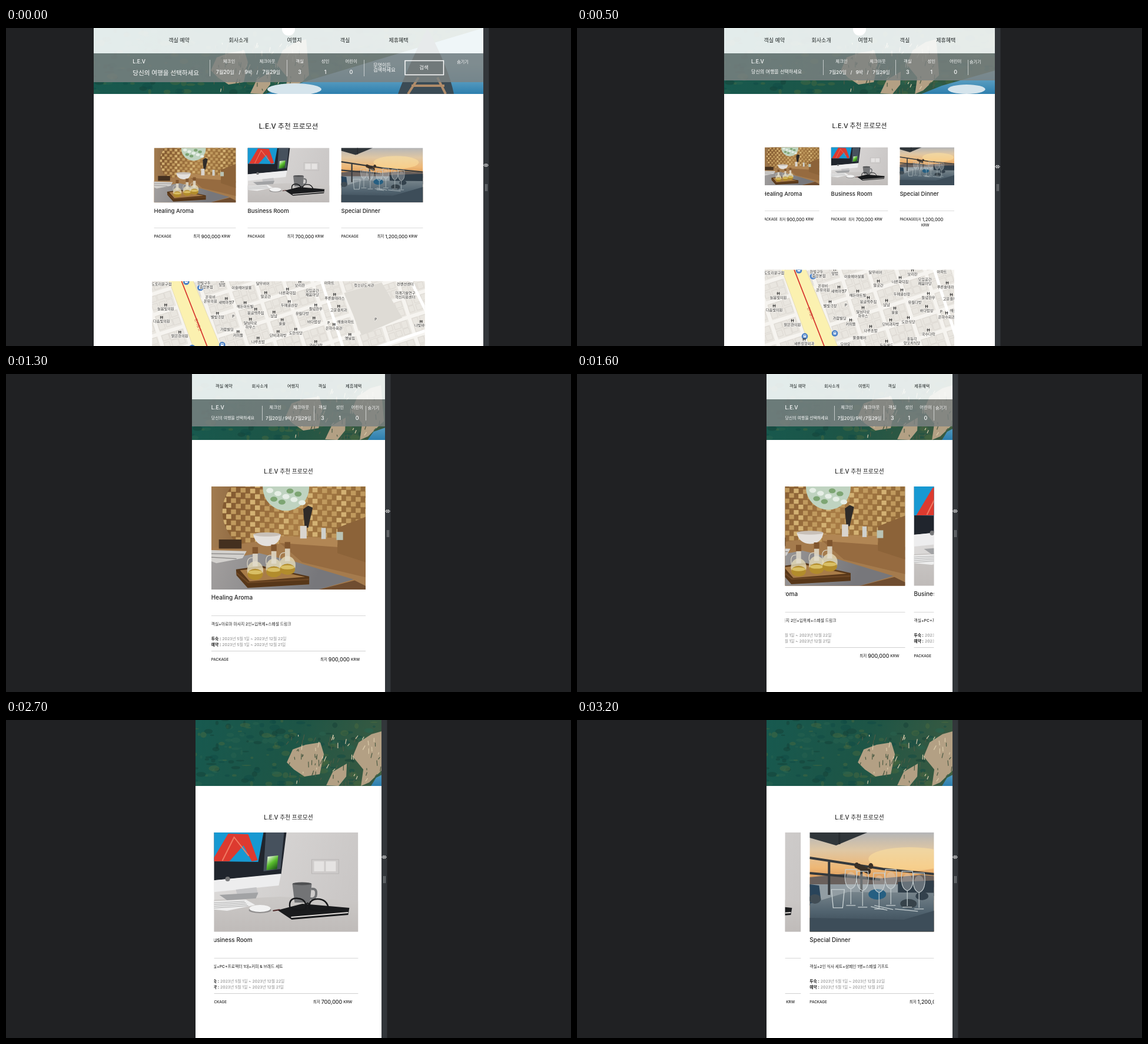
An HTML page with a canvas that plays this animation: 960x540 px, repeating every 3.3 s.

```html
<!DOCTYPE html>
<html lang="ko">
<head>
<meta charset="utf-8">
<style>
html, body { margin: 0; width: 100%; height: 100%; overflow: hidden; background: #202123; }
canvas { display: block; }
</style>
</head>
<body>
<canvas id="stage" width="960" height="540"></canvas>
<script>
const g = document.getElementById('stage').getContext('2d');
const BRAND = 'L.E.V';
const FONT = 'Inter, "Noto Sans CJK KR", "Noto Sans CJK", sans-serif';
const LOOP = 3300, STEP = 100;

// Left page edge over time; the page stays centred on x = 480.
const EDGE = [[0, 149], [100, 160], [300, 218], [500, 250], [600, 256], [900, 288], [1200, 309], [1300, 316], [1500, 322], [LOOP, 322]];
const WIDTHS = [662, 461, 384, 329];
let L, R, W;

const clamp = v => Math.max(0, Math.min(1, v));
const ease = (t, start, dur) => { const u = clamp((t - start) / dur); return u * u * (3 - 2 * u); };

function edgeAt(t) {
  const i = EDGE.findIndex(([time]) => time > t);
  const [t0, a] = EDGE[i - 1], [t1, b] = EDGE[i];
  return a + (b - a) * (t - t0) / (t1 - t0);
}

// Responsive value, given at each of WIDTHS.
function at(...v) {
  const i = W > 461 ? 0 : W > 384 ? 1 : 2;
  return v[i] + (v[i + 1] - v[i]) * (WIDTHS[i] - W) / (WIDTHS[i] - WIDTHS[i + 1]);
}

function random(seed) {
  return () => (seed = (seed * 16807) % 2147483647) / 2147483647;
}

function text(s, x, y, size, color = '#222', align = 'left', weight = 500) {
  g.font = `${weight} ${size}px ${FONT}`;
  g.fillStyle = color;
  g.textAlign = align;
  g.fillText(s, x, y + size * 0.36);
  return g.measureText(s).width;
}
const rect = (c, x, y, w, h) => { g.fillStyle = c; g.fillRect(x, y, w, h); };
const fill = (c, d) => { g.fillStyle = c; g.fill(new Path2D(d)); };
const line = (c, w, d) => { g.strokeStyle = c; g.lineWidth = w; g.stroke(new Path2D(d)); };
function oval(c, x, y, rx, ry = rx) {
  g.fillStyle = c;
  g.beginPath();
  g.ellipse(x, y, rx, ry, 0, 0, 7);
  g.fill();
}
function fade(x0, y0, x1, y1, ...colors) {
  const f = g.createLinearGradient(x0, y0, x1, y1);
  colors.forEach((c, i) => f.addColorStop(i / (colors.length - 1), c));
  return f;
}
function clipped(x, y, w, h, draw) {
  g.save();
  g.beginPath();
  g.rect(x, y, w, h);
  g.clip();
  draw();
  g.restore();
}

function hero() {
  const rnd = random(7);
  rect(fade(L, 0, R, 112, '#17594f', '#1d5546', '#3d5a40'), L, 0, W, 112);
  for (let i = 0; i < 420; i++) {
    g.globalAlpha = 0.45;
    oval(['#0f4a45', '#2b6350', '#153f36', '#4c6a3f'][i % 4], L + rnd() * 662, rnd() * 112, 2 + rnd() * 7, 1 + rnd() * 4);
  }
  g.globalAlpha = 1;
  g.save();
  g.translate(at(-130, -30, -12, -3), 0);
  fill('#b3a084', 'M478 72L488 50L510 42L535 38L541 58L534 92L508 96L490 84ZM545 111L556 88L580 74L579 96L566 112ZM590 62L600 38L622 24L640 19L645 80L618 106L604 112L608 84Z');
  for (let i = 0; i < 90; i++) {
    const x = 480 + rnd() * 160, y = 22 + rnd() * 86;
    line(i % 3 ? '#4c5b45' : '#dcccab', 1.2, `M${x} ${y}l${rnd() * 5 - 4} ${3 + rnd() * 7}`);
  }
  g.restore();
  const x = at(440, 585, 588, 614);
  fill(fade(0, 60, 0, 112, '#8fc0d6', '#2d7fae'), `M${x} 112L${x + at(45, 35, 16, 10)} 98L${R} ${at(0, 72, 82, 91)}V112Z`);
  if (W > 340) oval('#d5e4ec', at(490, 662, 655, 650), 104, at(46, 32, 20, 5), at(10, 8, 6, 3));
  if (W > 560) {
    fill('#3b4b55', `M${R - 145} 112Q${R - 130} 70 ${R - 95} 0Q${R - 58} 70 ${R - 50} 112Z`);
    line('#b08c6a', 4, `M${R - 128} 112L${R - 110} 84M${R - 64} 112L${R - 78} 84M${R - 122} 98H${R - 66}`);
  }
}

function header(dy) {
  g.save();
  g.translate(0, dy);
  const bottom = at(92, 89, 89, 89), white = '#fff';
  rect('rgba(250,252,252,.9)', L, 0, W, 43);
  rect('rgba(124,130,130,.83)', L, 43, W, bottom - 43);
  if (W > 440) oval(white, 480, 2, 11);
  const mid = (s, x, y, size, color = white) => text(s, x, y, size, color, 'center');
  const nav = at(9, 9, 9, 7.4), navColor = '#1e2424';
  mid('객실 예약', at(294, 335, 350, 370), 20.5, nav, navColor);
  mid('회사소개', at(395, 415, 422.5, 431), 20.5, nav, navColor);
  mid('여행지', at(490, 490, 489.5, 488), 20.5, nav, navColor);
  mid('객실', at(576, 557, 548, 537.5), 20.5, nav, navColor);
  mid('제휴혜택', at(667, 627, 611, 591), 20.5, nav, navColor);

  const y2 = at(76, 74, 75, 75);
  text(BRAND, L + W * 0.1, 57, 8.8, white);
  text('당신의 여행을 선택하세요', L + W * 0.1, y2, at(10.6, 8.1, 6.9, 6.9), white);
  for (const x of [at(346, 418, 428, 435), at(477, 541, 530, 523), at(608, 664, 632, 611)])
    rect('rgba(255,255,255,.6)', Math.round(x), 54, 1, at(28, 26, 25, 25));
  mid('체크인', at(379, 449.5, 454, 457.5), 56.5, 7.4);
  mid('체크아웃', at(444, 511, 505, 501.5), 56.5, 7.4);
  const date = at(8.4, 8, 7.7, 7.5);
  mid('7월20일', at(372.5, 443, 449, 455), 75, date);
  mid('/', at(397, 466, 470, 471), 75, date);
  mid('9박', at(412, 480, 480, 479.5), 75, date);
  mid('/', at(427, 494, 491, 488.5), 75, date);
  mid('7월29일', at(451, 517, 510.5, 505), 75, date);
  const guests = [['객실', 3, at(499, 562, 547.5, 538)], ['성인', 1, at(542.5, 602.5, 582, 567.5)], ['어린이', 0, at(586.5, 643.5, 616, 597)]];
  for (const [name, n, x] of guests) {
    mid(name, x, 56.5, 7.4);
    mid(n, x, 75, 9);
  }
  if (W > 600) {
    text('무엇이든', R - 187, 63, 8.2, white);
    text('검색하세요', R - 187, 71, 8.2, white);
    line(white, 1.5, `M${R - 133} 55.5H${R - 67.5}V79.5H${R - 133}Z`);
    mid('검색', R - 101, 67, 8.4);
  }
  mid('숨기기', at(776, 677, 652, 625), 57, 7);
  g.restore();
}

function aroma() {
  rect(fade(0, 0, 306, 0, '#a27c50', '#6a4526', '#5f3f22'), 0, 0, 306, 205);
  g.save();
  g.beginPath();
  g.ellipse(190, 50, 168, 112, 0, 0, 7);
  g.clip();
  rect(fade(30, 0, 306, 100, '#80572f', '#a87c45', '#8c6536'), 0, 0, 306, 170);
  for (let row = 0; row < 12; row++)
    for (let col = 0; col < 16; col++)
      rect(col % 3 ? '#c09a5e' : '#d3b173', 20 + col * 19 + row % 2 * 9.5, row * 11 + col * 1.5 - 22, 10, 9);
  g.restore();
  oval('#bfd3c0', 148, 2, 46);
  for (let i = 0; i < 9; i++) oval(i % 2 ? '#7da573' : '#e6eee6', 116 + i * 8, 8 + i * 17 % 28, 7, 5);
  fill('#a57b4d', 'M0 122L100 108L306 145V205H0Z');
  fill('#b18654', 'M136 98L250 102V122L136 112Z');
  fill('#966b40', 'M136 112L306 124V180L180 150Z');
  fill('#8c6339', 'M250 82L306 60V150L250 132Z');
  fill('#e4e0dc', 'M83 95H138Q134 118 110 118Q88 117 83 95Z');
  oval('#c8c0b8', 110.5, 95, 27, 4);
  fill('#2f2b28', 'M185 80L182 45L192 38L201 42L192 82Z');
  rect('#d9d4ce', 176, 78, 13, 25);
  rect('#cfd0cc', 218, 82, 9, 22);
  rect('#b9c3b5', 248, 90, 13, 16);
  rect('#44301f', 15, 105, 45, 18);
  fill(fade(0, 130, 200, 205, '#a3a09f', '#77777b'), 'M0 148L95 132L170 150L282 184L210 205H0Z');
  fill('#6f4d30', 'M210 205L284 186L306 197V205Z');
  fill('#d2d0cd', 'M0 126L70 128L62 142L10 152L0 148Z');
  line('#868483', 1.5, 'M0 133L65 134M0 140L50 143');
  fill('#573719', 'M49 164L100 157L194 178V194L72 201L50 176Z');
  fill('#a87c48', 'M57 166L100 161L186 179L76 188Z');
  for (const [x, y] of [[87, 174], [124, 169], [151, 164]]) {
    oval('rgba(230,220,185,.8)', x, y - 8, 16, 18);
    oval('#b28c2c', x, y, 15, 11);
    oval('#d9bf65', x, y - 4, 14, 4);
    rect('rgba(226,220,204,.85)', x - 5, y - 42, 10, 26);
    rect('#80562f', x - 5.5, y - 54, 11, 13);
    line('#d8d2c2', 1.5, `M${x - 5} ${y - 33}Q${x - 18} ${y - 34} ${x - 15} ${y - 15}`);
  }
  line('#6d4724', 3, 'M50 171L73 190L193 184');
}

function business() {
  rect(fade(0, 0, 253, 100, '#dedcdb', '#c9c6c5'), 0, 0, 253, 169);
  fill(fade(0, 110, 0, 169, '#cbc8c6', '#bfbbb9'), 'M0 115L120 109L253 116V169H0Z');
  fill('#20252d', 'M0 0H131L122 71L0 82Z');
  fill('#1799d2', 'M0 0H92L83 50L0 49Z');
  fill('#dd3a2f', 'M4 49L32 2L66 3L82 47L72 49L58 22L34 49Z');
  line('#f07a62', 2, 'M22 48L42 8L67 40');
  fill('#46515d', 'M96 0H127L121 62L92 66Z');
  fill(fade(98, 40, 116, 62, '#fff', '#59bd2c', '#174c18'), 'M99 41L117 39L115 62L97 64Z');
  fill('#ededee', 'M0 82L122 70L118 90L0 102Z');
  oval('#77787a', 31, 79, 4);
  fill('#c4c4c6', 'M45 97L80 93L83 106L48 108Z');
  fill('#a2a3a5', 'M17 106L83 102L79 112L30 115Z');
  fill('#eeeeee', 'M0 117L62 114L78 123L30 133L0 130Z');
  for (let i = 0; i < 4; i++) line('#9a9a9a', 0.8, `M0 ${120 + i * 3}L${60 + i * 2} ${117 + i * 2.5}`);
  oval('#8f8d8d', 86, 132, 19, 5);
  oval('#f2f2f2', 86, 129, 18, 6);
  g.strokeStyle = '#b9b6b5';
  g.lineWidth = 1;
  g.strokeRect(174, 46, 46, 24);
  rect('#e5e3e2', 178, 49, 17, 17);
  rect('#e5e3e2', 198, 49, 17, 17);
  fill('#737476', 'M141 87H174L171 119H145Z');
  oval('#4f5052', 157.5, 87, 16, 2.5);
  line('#737476', 4, 'M173 96Q184 94 181 108Q178 114 171 112');
  fill('#1a1b1d', 'M116 132L158 121L238 128L236 140L140 148Z');
  line('#e2dedb', 2, 'M139 144L236 136');
  line('#4c2525', 2, 'M108 133L120 131');
  line('#17181a', 2.5, 'M137 128Q134 111 150 112Q166 113 164 130Q150 134 137 128ZM170 130Q168 113 184 113Q200 113 203 130Q185 136 170 130ZM164 122Q167 118 170 122');
}

function dinner() {
  rect(fade(0, 0, 0, 90, '#b4b5b7', '#dfc7a4', '#eeb775', '#cf8a4c'), 0, 0, 253, 169);
  oval('rgba(255,226,158,.55)', 170, 45, 70, 20);
  fill('#69605c', 'M0 76L60 70L120 78L190 72L253 77V93H0Z');
  fill('#929da3', 'M0 88H253V115H0Z');
  fill('#30363a', 'M0 0H98L45 22L0 9Z');
  rect('#272c30', 49, 0, 3, 20);
  line('#34393d', 4, 'M0 43L125 62L253 75M33 47V106M88 58V100M0 69L120 80');
  for (let i = 0; i < 7; i++) oval('#3a3027', 80 + i * 4, 56 + i * 13 % 11, 4, 5);
  fill('#29445a', 'M0 88L16 90L20 121L0 124Z');
  fill('#303e49', 'M150 84L253 80V112L150 102Z');
  fill(fade(0, 100, 0, 169, '#78858c', '#51636f', '#34434f'), 'M0 121L65 101L253 103V169H0Z');
  fill('#3d4d59', 'M0 145L160 148L253 121V169H0Z');
  oval('#414d55', 9, 113, 10, 8);
  oval('#265f82', 115, 105, 15, 9);
  oval('#36424a', 168, 121, 14, 8);
  oval('#33414c', 191, 108, 11, 7);
  const glass = '#c7d0d2';
  for (let i = 0; i < 6; i++) {
    const x = 70 + i * 24 - i % 2 * 4, y = 63 + i % 3 * 3;
    line(glass, 1.2, `M${x - 9} ${y}Q${x - 13} ${y + 29} ${x} ${y + 33}Q${x + 13} ${y + 29} ${x + 9} ${y}ZM${x} ${y + 33}V${y + 59}M${x - 8} ${y + 61}H${x + 8}`);
    oval('rgba(218,222,219,.32)', x, y + 18, 9, 14);
  }
  line(glass, 1.4, 'M37 97L40 128H56L59 97ZM104 126L132 132M110 124L142 131M145 130L184 134');
}

const CARDS = [
  { name: 'Healing Aroma', note: '객실+아로마 마사지 2인+입욕제+스페셜 드링크', price: '900,000', photo: aroma, base: 306 },
  { name: 'Business Room', note: '객실+PC+프로젝터 1대+커피 & 브래드 세트', price: '700,000', photo: business, base: 253 },
  { name: 'Special Dinner', note: '객실+2인 식사 세트+샴페인 1병+스페셜 기프트', price: '1,200,000', photo: dinner, base: 253 }
];

function photo(card, x, y, w) {
  clipped(x, y, w, w * 0.667, () => {
    g.translate(x, y);
    g.scale(w / card.base, w / card.base);
    card.photo();
  });
}

function price(card, right, y, small, big, wrap) {
  if (!wrap) right -= text('KRW', right, y, small, '#222', 'right') + 2;
  right -= text(card.price, right, y, big, '#222', 'right') + 2;
  const w = text('최저', right, y, small, '#222', 'right');
  if (wrap) text('KRW', right - w + 11, y + 10, small);
}

function columns() {
  const w = at(139, 97, 81, 70), y = at(203.5, 202.5, 202, 202), end = y + w * 0.667;
  clipped(L + W * 0.15, 180, W * 0.7, 240, () => CARDS.forEach((card, i) => {
    const x = 480 - w / 2 + (i - 1) * (w + 20);
    photo(card, x, y, w);
    text(card.name, x, end + 14, 9.6);
    rect('#dcdcdc', x, Math.round(end + 43), w, 1);
    text('PACKAGE', x, end + 58, at(6.3, 5.6, 5.4, 5.4));
    const wrap = i === 2 && w < 110;
    price(card, x + w - (wrap ? 23 : 9.5), end + 58, at(6.3, 5.8, 5.6, 5.6), at(7.9, 7.4, 7.2, 7.2), wrap);
  }));
}

function carousel(pos) {
  const x0 = L + W * 0.1, w = W * 0.8, y = 191, end = y + w * 0.667;
  clipped(x0, y, w, 349, () => CARDS.forEach((card, i) => {
    const x = x0 + (i - pos) * (w + 15);
    if (x > x0 + w || x + w < x0) return;
    photo(card, x, y, w);
    text(card.name, x, end + 13.5, 10);
    rect('#d8d8d8', x, Math.round(end + 44), w, 1);
    text(card.note, x, end + 58.5, 6.8);
    [['투숙 :', 22], ['예약 :', 21]].forEach(([label, day], row) => {
      const ty = end + 83.5 + row * 10;
      text(label, x, ty, 6.8, '#222', 'left', 700);
      text(`2023년 5월 1일 ~ 2023년 12월 ${day}일`, x + 18.5, ty, 6.8, '#929292');
    });
    rect('#d0d0d0', x, Math.round(end + 104), w, 1);
    text('PACKAGE', x, end + 119, 6.3);
    price(card, x + w - 10, end + 119, 6.5, 8.8);
  }));
}

// name, x, y; a star adds a place icon above the name.
const PLACES = `도토리문구점,16,5|한빛구두,88,3|중앙본점,92,10|*덮밥,119,6|이슬헤어살롱,152,11|달무비어,188,4|*보리잔,251,7
모임공간,272,16|채움마당,272,23|*너른화덕집,230,20|*알곳간,193,26|아파트,301,3|*푸른솔테라스,310,29|청소년도서관,360,7|컨벤션센터,430,5
미래기술연구,430,20|혁신지원센터,430,27|온유비,99,27|온유의원,99,34|*새벽마켓7,126,36|*해든아트빌,158,43|*늘봄빛의원,23,47|*두메골산장,233,41
*들녘한우,278,47|*고운결치과,317,49|*별빛극장,111,61|*몽글맥주집,176,54|*냠냠,207,59|유월다방,255,55|*달님타로,167,71|하우스,167,78
*술술,221,72|*바다밥상,275,69|해솔아파트,329,69|*은하수회관,309,80|*다솜빛의원,16,68|*맑은한의원,47,93|가람빌딩,127,82|*커피뜰,146,92
*단비과자방,214,92|*도란식당,244,88|*나루초밥,180,103|*옛날집,336,97|*국수다락,278,109|*나빛바디,457,75|모아요,137,126|물결헤어,161,115
*든든샌드,207,128|*새론성형외과,67,125|홍등각,250,117|양꼬치식당,250,124|P,138,60|P,380,65|P,300,71`
  .split(/[|\n]/).map(s => s.split(','));

function map() {
  const x0 = L + W * 0.15, y0 = at(430, 410.5, 403, 398);
  clipped(x0, y0, W * 0.7, 540 - y0, () => {
    g.translate(x0, y0);
    rect('#f6f4f0', 0, 0, 470, 140);
    const rnd = random(31);
    g.save();
    g.rotate(-0.31);
    for (let x = -60; x < 480; x += 46)
      for (let y = -10; y < 300; y += 34) {
        rect('#e9e6e0', x, y, 40, 28);
        g.strokeStyle = '#d6d2cb';
        g.lineWidth = 0.6;
        for (let i = 0; i < 6; i++)
          g.strokeRect(x + 1 + i % 3 * 13, y + 1 + (i > 2) * 13, 9 + rnd() * 3, 9 + rnd() * 3);
      }
    g.restore();
    fill('#dedbd5', 'M326 20L390 2L425 62L356 92Z');
    line('#fff', 5, 'M288 0L330 130M440 0L470 60M345 125L470 82');
    fill('#fbf1b0', 'M29 0H70L128 140H80Z');
    line('#e7ddb4', 1, 'M29 0L80 140M70 0L128 140');
    line('#d6332d', 1.7, 'M50 0L105 140');
    g.save();
    g.translate(78, 74);
    g.rotate(1.19);
    text('한가람선', 0, 0, 6, '#c93a32', 'center');
    g.restore();
    for (const [x, y] of [[58, 1], [82, 11], [68, 113], [119, 108]]) {
      oval('#4a80c6', x, y, 5.3);
      rect('#fff', x - 2.3, y - 2.6, 4.6, 4.6);
      rect('#4a80c6', x - 1.5, y - 1.7, 3, 1.5);
    }
    for (const [s, px, py] of PLACES) {
      const x = +px, y = +py;
      g.lineJoin = 'round';
      g.lineWidth = 1.6;
      g.strokeStyle = '#f6f4f0';
      g.font = `500 6.2px ${FONT}`;
      g.textAlign = 'center';
      const name = s.replace('*', '');
      g.strokeText(name, x, y + 2.2);
      text(name, x, y, 6.2, '#333', 'center');
      if (s[0] === '*') line('#333', 1, `M${x - 1.5} ${y - 9}v5M${x + 1.5} ${y - 9}v5M${x - 2.5} ${y - 7}h5`);
    }
  });
}

function handle() {
  rect('#32363a', R, 0, 9.5, 540);
  rect('#94979a', R + 3.3, 265, 1, 12);
  rect('#94979a', R + 5.6, 265, 1, 12);
  const y = at(233, 235.5, 234, 233), x = R + 4.5;
  line('#e8e8e8', 1, `M${x - 1} ${y - 2.5}L${x - 4} ${y}L${x - 1} ${y + 2.5}ZM${x + 1} ${y - 2.5}L${x + 4} ${y}L${x + 1} ${y + 2.5}Z`);
}

function draw(t) {
  L = edgeAt(t);
  R = 960 - L;
  W = R - L;
  rect('#202123', 0, 0, 960, 540);
  rect('#fff', L, 0, W, 540);
  clipped(L, 0, W, 112, () => {
    hero();
    header(-95 * ease(t, 1820, 180));
  });
  text(BRAND + ' 추천 프로모션', 480, at(167, 166.5, 165.5, 165.5), at(11.8, 10.9, 9.8, 9.8), '#222', 'center');
  if (W > 440) {
    columns();
    map();
  } else {
    carousel(ease(t, 1450, 550) + ease(t, 2620, 773));
  }
  handle();
}

const start = performance.now();
function tick() {
  const t = (performance.now() - start) % LOOP;
  draw(Math.floor(t / STEP) * STEP);
  requestAnimationFrame(tick);
}
tick();
</script>
</body>
</html>
```
